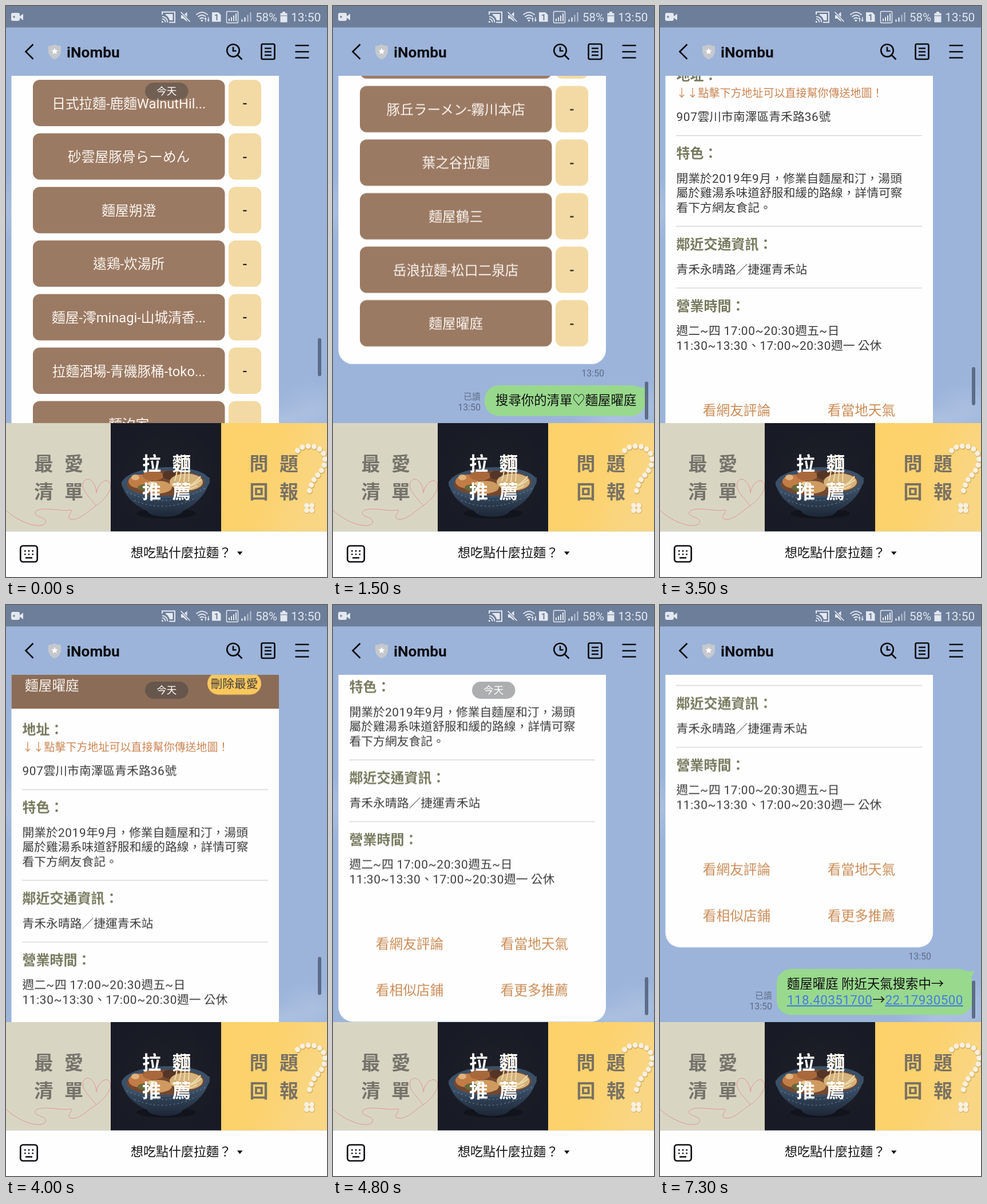
Animation of 561x998 px, one loop 8000 ms. Source, as an HTML page:

```html
<!DOCTYPE html>
<html lang="zh-Hant">
<head>
<meta charset="utf-8">
<title>拉麵推薦</title>
<style>
html, body { margin: 0; width: 100%; height: 100%; overflow: hidden; background: #9cb4da; }
svg.stage { display: block; width: 100vw; height: 100vh; }
text { font-family: Roboto, "Noto Sans CJK TC", "Noto Sans CJK JP", "Noto Sans CJK", sans-serif; white-space: pre; }
.mid { text-anchor: middle; }
.end { text-anchor: end; }
.name { font-size: 23.7px; fill: #fbf6f1; }
.head { font-size: 24px; font-weight: 700; fill: #777a5e; }
.body { font-size: 20.8px; fill: #3c3c3e; }
.num { letter-spacing: .65px; }
.link { font-size: 23.7px; fill: #cb8c56; }
.note { font-size: 16px; fill: #5d6c86; }
.seen { font-size: 14.6px; fill: #5d6c86; }
.say { font-size: 22.4px; fill: #111; }
.geo { fill: #477be0; text-decoration: underline; letter-spacing: .4px; }
.tile { font-size: 33px; font-weight: 700; letter-spacing: 19.5px; }
.ink { fill: none; stroke: #0c0d10; stroke-width: 2.7; }

.anim { animation: 8s linear -20ms infinite; }
.cut { animation-timing-function: step-end; }
#first { animation-name: first; }
#second { animation-name: second; }
#list { animation-name: list; }
#card { animation-name: card; }
#sent1 { animation-name: sent1; }
#sent2 { animation-name: sent2; }
#seen2 { animation-name: seen2; }
#press { animation-name: press; }
#pill { animation-name: pill; }
#thumb { animation-name: thumb; }
#fade { animation-name: fade; }
#net { animation-name: net; }

@keyframes first { 0% { opacity: 1 } 33.75%, 100% { opacity: 0 } }
@keyframes second { 0% { opacity: 0 } 33.75%, 100% { opacity: 1 } }
@keyframes sent1 { 0% { opacity: 0 } 18.75%, 100% { opacity: 1 } }
@keyframes sent2 { 0% { opacity: 0 } 87.5%, 100% { opacity: 1 } }
@keyframes seen2 { 0% { opacity: 0 } 91.25%, 100% { opacity: 1 } }
@keyframes press { 0% { opacity: 0 } 75% { opacity: 1 } 78.75%, 100% { opacity: 0 } }
@keyframes net { 0% { opacity: 1 } 61.25% { opacity: .4 } 85%, 100% { opacity: 1 } }
@keyframes list {
  0%, 1.25% { transform: translateY(578.9px); animation-timing-function: cubic-bezier(.2, .55, .5, 1) }
  8.75% { transform: none; animation-timing-function: step-end }
  18.75%, 100% { transform: translateY(-65.6px) }
}
@keyframes card {
  0% { transform: none; animation-timing-function: step-end }
  43.75%, 45% { transform: translateY(151px); animation-timing-function: ease-out }
  46.25%, 48.75% { transform: translateY(215px); animation-timing-function: ease-out }
  52.5%, 53.75% { transform: translateY(271px); animation-timing-function: ease-in-out }
  62.5% { transform: none; animation-timing-function: step-end }
  87.5%, 100% { transform: translateY(-93.4px) }
}
@keyframes thumb {
  0%, 1.25% { transform: translateY(-76px); animation-timing-function: cubic-bezier(.2, .55, .5, 1) }
  8.75% { transform: none; animation-timing-function: step-end }
  43.75%, 45% { transform: translateY(-25.5px); animation-timing-function: ease-out }
  46.25%, 48.75% { transform: translateY(-36px); animation-timing-function: ease-out }
  52.5%, 53.75% { transform: translateY(-45.5px); animation-timing-function: ease-in-out }
  62.5%, 100% { transform: none }
}
@keyframes fade {
  0%, 72.5% { opacity: 1 }
  78.75% { opacity: 0; animation-timing-function: step-end }
  87.5%, 100% { opacity: 1 }
}
@keyframes pill {
  0%, 11.25% { opacity: 1 }
  15% { opacity: 0; animation-timing-function: step-end }
  45%, 63.75% { opacity: 1 }
  66.25%, 100% { opacity: 0 }
}
</style>
</head>
<body>
<svg class="stage" viewBox="0 0 561 998" preserveAspectRatio="none">
  <defs>
    <clipPath id="view"><rect y="122" width="561" height="607"/></clipPath>
    <clipPath id="left"><rect y="729" width="183" height="189"/></clipPath>
    <radialGradient id="cloud"><stop offset="0" stop-color="#b4c7e4" stop-opacity=".6"/><stop offset="1" stop-color="#b4c7e4" stop-opacity="0"/></radialGradient>
    <linearGradient id="sun" x2="1" y2=".35"><stop offset="0" stop-color="#fdd169"/><stop offset=".55" stop-color="#fcd26e"/><stop offset="1" stop-color="#f9d684"/></linearGradient>
    <radialGradient id="night"><stop offset="0" stop-color="#1e2029"/><stop offset="1" stop-color="#181b25"/></radialGradient>
    <linearGradient id="bowl" x2="0" y2="1"><stop offset="0" stop-color="#48607a"/><stop offset="1" stop-color="#1c2737"/></linearGradient>
  </defs>

  <!-- wallpaper -->
  <rect width="561" height="998" fill="#9cb4da"/>
  <ellipse cx="535" cy="705" rx="75" ry="48" fill="url(#cloud)"/>
  <ellipse cx="485" cy="722" rx="70" ry="24" fill="url(#cloud)"/>
  <ellipse cx="0" cy="355" rx="26" ry="55" fill="url(#cloud)"/>

  <g clip-path="url(#view)">
    <g id="first" class="anim cut">
      <g id="list" class="anim">
        <rect x="9.500" y="-620" width="467.500" height="1311.500" rx="25" fill="#fefefe"/>
        <g id="rows"></g>
        <text class="note end" x="474" y="713">13:50</text>
      </g>
      <g id="sent1" class="anim cut">
        <rect x="265" y="663" width="281" height="53.500" rx="25" fill="#98d98d"/>
        <path d="M528 664Q539 669 549 666.500Q547 677 540 678Z" fill="#98d98d"/>
        <text class="say" x="284" y="697">搜尋你的清單♡麵屋曜庭</text>
        <text class="seen end" x="257.500" y="688">已讀</text>
        <text class="note end" x="258" y="707">13:50</text>
      </g>
    </g>

    <g id="second" class="anim cut">
      <g id="card" class="anim">
        <g transform="translate(0 -271)">
          <rect x="9.500" y="123" width="467.500" height="839.500" rx="25" fill="#fefefe"/>
          <path d="M9.500 205V148a25 25 0 0 1 25-25H452a25 25 0 0 1 25 25V205Z" fill="#8b6c57"/>
          <text class="name" x="33" y="172.500">麵屋曜庭</text>
          <rect x="352" y="141.500" width="94" height="39" rx="19.500" fill="#fcc75c"/>
          <text class="body mid" x="399" y="169">刪除最愛</text>

          <text class="head" x="28.500" y="249.500">地址：</text>
          <text x="28.500" y="279" font-size="19" fill="#cb8450">↓↓點擊下方地址可以直接幫你傳送地圖！</text>
          <text class="body" x="28.500" y="320.500"><tspan class="num">907</tspan>雲川市南澤區青禾路<tspan class="num">36</tspan>號</text>
          <text class="head" x="28.500" y="385.500">特色：</text>
          <text class="body" x="28.500" y="428.500">開業於<tspan class="num">2019</tspan>年<tspan class="num">9</tspan>月，修業自麵屋和汀，湯頭</text>
          <text class="body" x="28.500" y="454.200">屬於雞湯系味道舒服和緩的路線，詳情可察</text>
          <text class="body" x="28.500" y="479.800">看下方網友食記。</text>
          <text class="head" x="28.500" y="544.500">鄰近交通資訊：</text>
          <text class="body" x="28.500" y="587.500">青禾永晴路／捷運青禾站</text>
          <text class="head" x="28.500" y="652.500">營業時間：</text>
          <text class="body" x="28.500" y="695">週二<tspan class="num">~</tspan>四<tspan class="num"> 17:00~20:30</tspan>週五<tspan class="num">~</tspan>日</text>
          <text class="body" x="28.500" y="720.700"><tspan class="num">11:30~13:30</tspan>、<tspan class="num">17:00~20:30</tspan>週一 公休</text>
          <path d="M28 346.500H458M28 505H458M28 612.800H458" stroke="#d6d6dc" stroke-width="1.300"/>

          <rect id="press" class="anim cut" x="243" y="785" width="218.500" height="81" rx="11" fill="#c9c9c9"/>
          <g class="mid">
            <text class="link" x="134" y="835">看網友評論</text>
            <text class="link" x="352" y="835">看當地天氣</text>
            <text class="link" x="134" y="916">看相似店鋪</text>
            <text class="link" x="352" y="916">看更多推薦</text>
          </g>
          <text class="note end" x="474" y="984">13:50</text>
        </g>
      </g>
      <g id="sent2" class="anim cut">
        <rect x="204" y="636" width="342" height="80.500" rx="25" fill="#98d98d"/>
        <path d="M528 637Q539 642 549 639.500Q547 650 540 651Z" fill="#98d98d"/>
        <text class="say" x="222" y="669.500">麵屋曜庭 附近天氣搜索中→</text>
        <text class="say" x="222" y="697.500"><tspan class="geo">118.40351700</tspan>→<tspan class="geo">22.17930500</tspan></text>
        <text id="seen2" class="seen end anim cut" x="195.500" y="688">已讀</text>
        <text class="note end" x="196" y="707">13:50</text>
      </g>
    </g>

    <g id="pill" class="anim">
      <rect x="243" y="134" width="75.500" height="30" rx="15" fill="#33383c" fill-opacity=".4"/>
      <text class="mid" x="280.700" y="155.300" font-size="17.500" fill="#fff">今天</text>
    </g>
    <g id="fade" class="anim">
      <rect id="thumb" class="anim" x="545" y="656.500" width="6" height="66.500" rx="3" fill="#4d5a74" fill-opacity=".82"/>
    </g>
  </g>

  <!-- status bar -->
  <rect width="561" height="37.500" fill="#6c7e9a"/>
  <g fill="#e3e8f0">
    <rect x="9" y="12" width="15" height="14" rx="3"/>
    <path d="M24 18L30 13.500V25L24 20.500Z"/>
    <circle cx="14" cy="19" r="1.700" fill="#6c7e9a"/>
    <path d="M273 15V10.500H295V28.500H285" fill="none" stroke="#e3e8f0" stroke-width="2"/>
    <path d="M273 18.500a10 10 0 0 1 9.500 10M273 22.500a6 6 0 0 1 5.500 6" fill="none" stroke="#e3e8f0" stroke-width="2"/>
    <path d="M272 26a3 3 0 0 1 3 3H272ZM279 14H291.500V25H286Q284 18 279 16Z"/>
    <path d="M306 16H310L316.500 10.500V27.500L310 22H306Z"/>
    <path d="M305.500 10.500L321.500 27.500" stroke="#6c7e9a" stroke-width="4"/>
    <path d="M305.500 10.500L321.500 27.500" stroke="#e3e8f0" stroke-width="1.800"/>
    <path d="M332.500 15.500Q342.500 6.500 352.500 15.500M335.500 19Q342.500 13 349 18.500M338.500 22.500Q342.500 19 346 22" fill="none" stroke="#dce2ec" stroke-width="2"/>
    <circle cx="342.300" cy="25.500" r="1.800"/>
    <path id="net" class="anim cut" d="M346.500 23L348.700 19.500L351 23ZM348 23H349.500V27.500H348ZM351.500 24L353.700 27.700L356 24ZM353 19.500H354.500V24H353Z"/>
    <path d="M360 11H371L375.500 15.500V27.500H360Z"/>
    <text class="mid" x="368" y="24.500" font-size="14" font-weight="700" fill="#6c7e9a">1</text>
    <rect x="385.500" y="9.500" width="20" height="20" rx="1.500" fill="none" stroke="#e3e8f0" stroke-width="1.500"/>
    <path d="M390 26.500V22M394 26.500V19.500M398 26.500V16.500M402 26.500V13" stroke="#e3e8f0" stroke-width="2"/>
    <path d="M412.500 27.500V23.500M417.500 27.500V20" stroke="#e3e8f0" stroke-width="2.300"/>
    <path d="M422.500 27.500V15.500M427.500 27.500V11" stroke="#b2bccd" stroke-width="2.300"/>
    <text x="436" y="27" font-size="20.500">58%</text>
    <path d="M483 10H488V12.500H491.500V28.500H479.500V12.500H483Z"/>
    <path d="M479.500 17H491.500" stroke="#a5b0c4" stroke-width="2"/>
    <text x="498" y="27" font-size="21">13:50</text>
  </g>

  <!-- chat header -->
  <path class="ink" d="M47.500 67L34.500 79.800L47.500 92.700"/>
  <path d="M85 67Q90 70 96 70V80Q95 89 85 93.500Q75 89 74 80V70Q80 70 85 67Z" fill="#c5c8cc"/>
  <path d="M85 73.500l1.700 3.700 4 .4-3 2.700.9 4-3.600-2.100-3.600 2.100.9-4-3-2.700 4-.4Z" fill="#fff"/>
  <text x="106" y="90" font-size="26.300" font-weight="700" fill="#0c0d10">iNombu</text>
  <g class="ink">
    <circle cx="397" cy="77.800" r="10.800"/>
    <path d="M405 86L412.500 93.500M397 71.500V78.500H402.500"/>
    <rect x="446.500" y="66.500" width="23" height="26.500" rx="2.500"/>
    <path d="M452 74H464M452 80H464M452 86H464M505.500 69H529.500M505.500 80H529.500M505.500 90.500H529.500"/>
  </g>

  <!-- menu tiles -->
  <rect y="729" width="184" height="189.500" fill="#d8d6c3"/>
  <path clip-path="url(#left)" d="M0 881C22 903 62 916 69 903C74 894 48 893 51 885C57 873 96 884 111 881C123 879 101 894 114 897C130 899 143 882 157 874C171 864 186 847 182 835C176 821 159 837 158 851C158 836 145 819 136 831C128 845 150 862 158 874" fill="none" stroke="#e78f8f" stroke-width=".95"/>
  <rect x="183" y="729" width="193.500" height="189.500" fill="url(#night)"/>
  <ellipse cx="280" cy="887" rx="52" ry="9" fill="#11141c"/>
  <path d="M202 831Q206 864 247 883Q251 892 279 893Q304 892 309 883Q352 861 356 824Z" fill="url(#bowl)"/>
  <g transform="rotate(-2 279 833)">
    <ellipse cx="279" cy="833" rx="77" ry="27" fill="#3a5068"/>
    <ellipse cx="279" cy="834" rx="68" ry="22" fill="#74482f"/>
  </g>
  <ellipse cx="234" cy="831" rx="20" ry="12" fill="#c27c46"/>
  <ellipse cx="257" cy="821" rx="18" ry="9" fill="#a9683c"/>
  <ellipse cx="266" cy="841" rx="24" ry="11" fill="#cf9a60"/>
  <ellipse cx="242" cy="842" rx="12" ry="6" fill="#65693a"/>
  <ellipse cx="226" cy="824" rx="7" ry="5" fill="#e0b27c"/>
  <ellipse cx="286" cy="820" rx="12" ry="8" fill="#553626"/>
  <ellipse cx="255" cy="835" rx="8" ry="4" fill="#e6cfa2"/>
  <ellipse cx="315" cy="832" rx="29" ry="15" fill="#d3b27c"/>
  <path d="M295 830Q302 806 300 786M303 831Q309 808 306 784M311 832Q315 806 312 784M319 831Q321 806 318 786M290 836Q315 850 341 828M296 842Q322 846 340 822M304 846Q324 846 334 838" fill="none" stroke="#efd9a8" stroke-width="2.200"/>
  <path d="M211 849Q278 882 348 843M224 864Q278 887 333 859" fill="none" stroke="#7a95ac" stroke-width="1.600" stroke-dasharray="3 4" opacity=".5"/>
  <rect x="376" y="729" width="185" height="189.500" fill="url(#sun)"/>
  <g fill="none" stroke-linecap="round">
    <path id="pearls" d="M509.500 777C516 769 526 769 535 769.500C549 771 560 782 557 799C553 815 541 821 536 832C531 842 529 849 530 857" stroke="#d8b56c" stroke-width="10.500" stroke-dasharray="0 10.400" transform="translate(.8 1.200)"/>
    <path d="M509.500 777C516 769 526 769 535 769.500C549 771 560 782 557 799C553 815 541 821 536 832C531 842 529 849 530 857" stroke="#f8f0dd" stroke-width="9" stroke-dasharray="0 10.400"/>
    <path d="M526 873.500h0M535 873.500h0M526 882h0M535 882h0" stroke="#d8b56c" stroke-width="10.500"/>
    <path d="M525.500 873h0M534.500 873h0M525.500 881.500h0M534.500 881.500h0" stroke="#f8f0dd" stroke-width="9"/>
  </g>
  <g class="tile">
    <g fill="#77736c"><text x="49.500" y="811.500">最愛</text><text x="49.500" y="861">清單</text></g>
    <g fill="#fff"><text x="238" y="811.500">拉麵</text><text x="238" y="861">推薦</text></g>
    <g fill="#7a7263"><text x="425.500" y="811.500">問題</text><text x="425.500" y="861">回報</text></g>
  </g>

  <!-- input bar -->
  <rect y="918.500" width="561" height="79.500" fill="#fefefe"/>
  <rect class="ink" x="25.300" y="943.500" width="29.400" height="28" rx="4.500"/>
  <path class="ink" d="M32 952.500h2.600M38.700 952.500h2.600M45.400 952.500h2.600M32 958.300h2.600M38.700 958.300h2.600M45.400 958.300h2.600M34 964.500h12" style="stroke-width:2.300"/>
  <text x="218" y="963" font-size="22" fill="#111">想吃點什麼拉麵？</text>
  <path d="M404 953.500H413.500L408.700 959.500Z" fill="#111"/>
</svg>
<script>
const names = [
  '日式拉麵-鹿麵WalnutHil...', '砂雲屋豚骨らーめん', '麵屋朔澄', '遠鶏-炊湯所',
  '麵屋-澪minagi-山城清香...', '拉麵酒場-青磯豚桶-toko...', '麵汐家', '豚丘ラーメン-霧川本店',
  '葉之谷拉麵', '麵屋鶴三', '岳浪拉麵-松口二泉店', '麵屋曜庭'
];
const pitch = 93.6, lastTop = 579.7;

document.getElementById('rows').innerHTML = names.map((name, i) => {
  const y = lastTop - pitch * (names.length - 1 - i);
  return `<g transform="translate(0 ${y.toFixed(1)})">
    <rect x="47" width="335.500" height="81" rx="12" fill="#9b7a63"/>
    <rect x="389" width="57" height="81" rx="12" fill="#f3daa4"/>
    <text class="name mid" x="214.700" y="49.500">${name}</text>
    <text class="mid" x="417.500" y="49" font-size="24" font-weight="500" fill="#222">-</text>
  </g>`;
}).join('');
</script>
</body>
</html>
```
